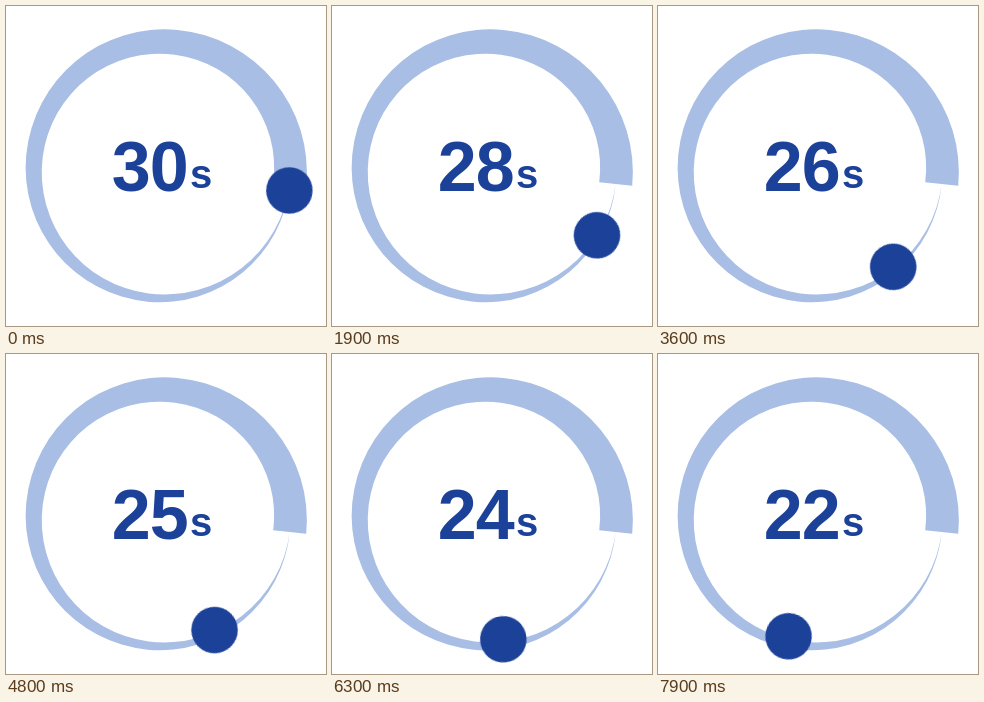
An HTML page without scripts for the animation above (8 s loop, 320 by 320 pixels).

```html
<!DOCTYPE html>
<html lang="en">
<head>
<meta charset="utf-8">
<title>Countdown</title>
<style>
  html, body { margin: 0; width: 100%; height: 100%; overflow: hidden; background: #fff; }
  svg { display: block; width: 100%; height: 100%; }
  .ring { fill: #a9bee4; }
  .dot, text { fill: #1c4199; }
  text { font: bold 70px "Liberation Sans", Arial, sans-serif; letter-spacing: -1px; }
  .unit { font-size: 40px; letter-spacing: 0; }

  /* ten moves a second; the tiny negative delay keeps steps clear of the tick */
  .dot { animation: orbit 8s steps(80) -5ms infinite; }
  @keyframes orbit {
    from { transform: rotate(11.22deg); }
    to { transform: rotate(104.7deg); }
  }

  /* one row per second, first change after 0.6 s */
  .reel { animation: count 8s step-end -5ms infinite; }
  @keyframes count {
    0% { transform: translateY(0); }
    7.5% { transform: translateY(-80px); }
    20% { transform: translateY(-160px); }
    32.5% { transform: translateY(-240px); }
    45% { transform: translateY(-320px); }
    57.5% { transform: translateY(-400px); }
    70% { transform: translateY(-480px); }
    82.5% { transform: translateY(-560px); }
    95%, 100% { transform: translateY(-640px); }
  }
</style>
</head>
<body>
<svg viewBox="0 0 320 320">
  <clipPath id="window"><rect x="95" y="125" width="100" height="70"/></clipPath>

  <!-- ring that tapers evenly from the blunt end to a point -->
  <path class="ring" transform="translate(156.1 163.9) rotate(6.3)" d="
    M145 0
    A143 143 0 0 0 0 -140.85
    A138.8 138.8 0 0 0 -136.7 0
    A134.6 134.6 0 0 0 0 132.55
    A130.5 130.5 0 0 0 128.4 0
    A126.3 126.3 0 0 1 0 124.25
    A122.2 122.2 0 0 1 -120.1 0
    A118 118 0 0 1 0 -115.95
    A113.9 113.9 0 0 1 111.8 0Z"/>

  <g transform="translate(160 160)">
    <circle class="dot" cx="125.8" r="23.2"/>
  </g>

  <g clip-path="url(#window)">
    <g class="reel">
      <text x="105.8" y="184.5">30</text>
      <text x="105.8" y="264.5">29</text>
      <text x="105.8" y="344.5">28</text>
      <text x="105.8" y="424.5">27</text>
      <text x="105.8" y="504.5">26</text>
      <text x="105.8" y="584.5">25</text>
      <text x="105.8" y="664.5">24</text>
      <text x="105.8" y="744.5">23</text>
      <text x="105.8" y="824.5">22</text>
    </g>
  </g>
  <text class="unit" x="184" y="182.3">s</text>
</svg>
</body>
</html>
```
